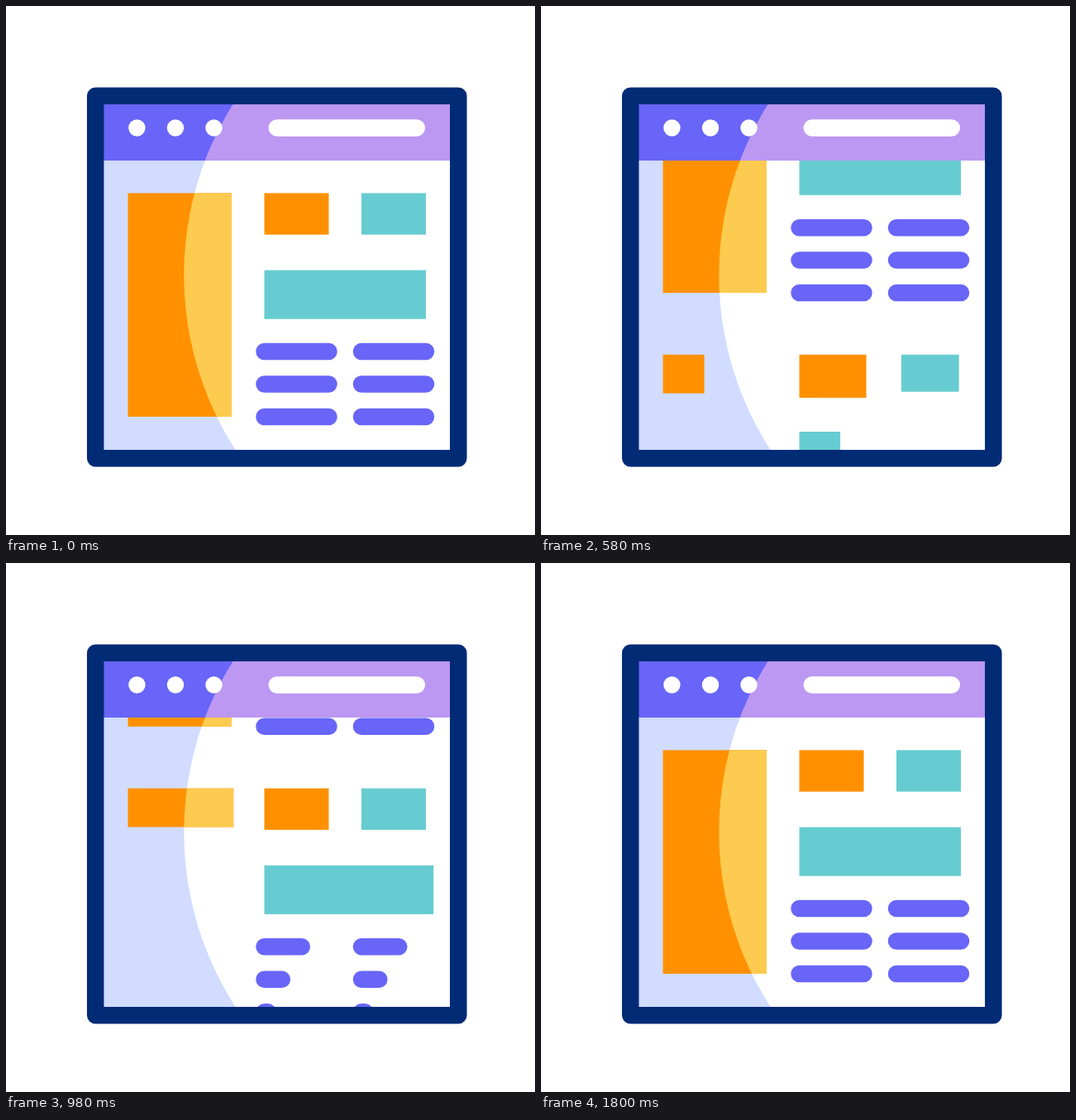
An HTML page with a canvas that plays this animation: 640 px wide and 640 px high, repeating every 2020 ms.

```html
<!DOCTYPE html>
<html lang="en">
<head>
<meta charset="utf-8">
<title>Scrolling page</title>
<style>
html, body { margin: 0; width: 100%; height: 100%; overflow: hidden; background: #fff; }
canvas { display: block; width: 100%; height: 100%; }
</style>
</head>
<body>
<canvas id="stage" width="640" height="640"></canvas>
<script>
const ctx = document.getElementById('stage').getContext('2d');
const LOOP = 2020, STEP = 20;
const SCROLL = 345.3, SCROLL_TIME = 1272;
const NAVY = '#022b76', PURPLE = '#6865f8', LILAC = '#bc98f2', PALE = '#d1dcfe';
const ORANGE = '#ff9100', YELLOW = '#fdcb50', TEAL = '#66ccd1', WHITE = '#fff';
const PEN = 20.5;

function ease(t, from, to) {
  const s = Math.min(1, Math.max(0, (t - from) / (to - from)));
  return s * s * (3 - 2 * s);
}

// Rise from a to peak, then settle at b.
function spring(t, [start, top, end], a, peak, b) {
  return a + (peak - a) * ease(t, start, top) + (b - peak) * ease(t, top, end);
}

function box(color, x, y, w, h) {
  ctx.fillStyle = color;
  ctx.fillRect(x, y, w, h);
}

function pill(color, x, y, len) {
  ctx.strokeStyle = color;
  ctx.lineWidth = PEN;
  ctx.lineCap = 'round';
  ctx.beginPath();
  ctx.moveTo(x, y);
  ctx.lineTo(x + len + 0.01, y);
  ctx.stroke();
}

function circle(color, x, y, r) {
  ctx.fillStyle = color;
  ctx.beginPath();
  ctx.arc(x, y, r, 0, Math.PI * 2);
  ctx.fill();
}

function clipped(x, y, w, h, draw) {
  ctx.save();
  ctx.beginPath();
  ctx.rect(x, y, w, h);
  ctx.clip();
  draw();
  ctx.restore();
}

// A box whose part inside the big disc takes a lighter colour.
function litBox(color, light, x, y, w, h) {
  box(color, x, y, w, h);
  clipped(x, y, w, h, () => circle(light, 605.3, 325.5, 390));
}

const full = {
  sideW: 125.5, sideH: 270.5, small: 1, tealScale: 1, tealShift: 0,
  banner: 195.5, lines: [78, 78, 78]
};

function growing(t) {
  const tealTimes = [308, 715, 930];
  return {
    sideW: spring(t, [430, 835, 1035], 10.8, 137.5, 125.5),
    sideH: spring(t, [1043, 1448, 1630], 46.8, 285.2, 270.5),
    small: spring(t, [228, 630, 830], 0.39, 1.068, 1),
    tealScale: spring(t, tealTimes, 0.39, 1.068, 1),
    tealShift: spring(t, tealTimes, 0, 8, 0),
    banner: spring(t, [490, 890, 1090], 25.6, 211.5, 195.5),
    lines: [0, 1, 2].map(i => {
      const start = 682 + i * 110;
      return spring(t, [start, start + 600, start + 895], 0, 91.5, 78);
    })
  };
}

function page(y, p) {
  litBox(ORANGE, YELLOW, 147.5, y + 226.4, p.sideW, p.sideH);
  box(ORANGE, 312.5, y + 226.4, 78 * p.small, 50.2 * p.small);
  box(TEAL, 430 + p.tealShift, y + 226.4, 78 * p.tealScale, 50.2 * p.tealScale);
  box(TEAL, 312.5, y + 319.6, p.banner, 59.1);
  p.lines.forEach((len, i) => {
    if (len <= 0) return;
    const row = y + 418.1 + i * 39.4;
    pill(PURPLE, 312.5, row, len);
    pill(PURPLE, 430, row, len);
  });
}

function draw(t) {
  box(WHITE, 0, 0, 640, 640);
  litBox(PALE, WHITE, 118, 187, 420, 351);
  const y = -SCROLL * ease(t, 0, SCROLL_TIME);
  clipped(118, 187, 420, 351, () => {
    page(y, full);
    page(y + SCROLL, growing(t));
  });

  litBox(PURPLE, LILAC, 118, 118, 420, 69);
  [158.4, 205, 251.5].forEach(x => circle(WHITE, x, 147.5, 10.2));
  pill(WHITE, 327.8, 147.5, 169);

  ctx.strokeStyle = NAVY;
  ctx.lineWidth = PEN;
  ctx.lineJoin = 'round';
  ctx.strokeRect(108.2, 108.8, 439.1, 438.5);
}

function tick(now) {
  draw(Math.floor((now % LOOP) / STEP) * STEP);
  requestAnimationFrame(tick);
}
draw(0);
requestAnimationFrame(tick);
</script>
</body>
</html>
```
